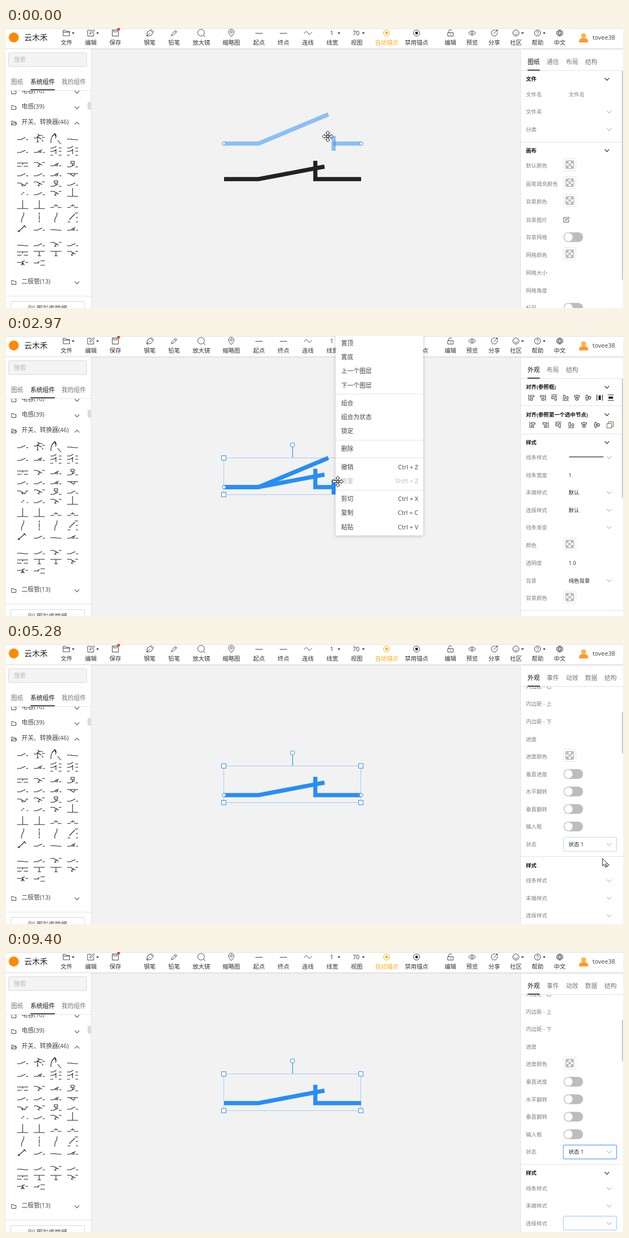
Animation, 1112 px wide and 504 px high, one loop 9.48 s. Source, as an HTML page:

```html
<!DOCTYPE html>
<html lang="zh-CN">
<head>
<meta charset="utf-8">
<title>组合为状态</title>
<style>
html, body { margin: 0; width: 100%; height: 100%; overflow: hidden; background: #f2f2f2; }
svg { display: block; width: 1112px; height: 504px; }
text { font-family: "Open Sans", "Noto Sans CJK SC", "Noto Sans CJK JP", "Noto Sans CJK", sans-serif; white-space: pre; }
.brand { font-size: 14px; fill: #222; }
.bar { font-size: 10.5px; fill: #333; text-anchor: middle; }
.gold { fill: #faad14; }
.side { font-size: 11px; fill: #444; }
.dim { fill: #777; }
.pale { fill: #bbb; }
.on { fill: #111; font-weight: 500; }
.lab { font-size: 9.6px; fill: #808080; }
.val { font-size: 9.6px; fill: #222; }
.head { font-size: 9.6px; fill: #111; font-weight: 600; }
.end { text-anchor: end; }
.pen { fill: none; stroke-width: 7.5; }
.ctl { fill: #fff; stroke: #278df8; stroke-width: 1; }
.cur { fill: #fff; stroke: #222; stroke-width: 1; stroke-linejoin: round; }
</style>
</head>
<body>
<svg id="stage" viewBox="0 0 1112 504"></svg>
<script>
const LOOP = 9480, BLUE = '#278df8', LIGHT = 'rgba(39,141,248,.5)', BLACK = '#222';
const lift = { brand: 5.2, bar: 3.9, side: 4.1, lab: 3.6, val: 3.6, head: 3.6 };

const text = (x, y, s, cls) =>
  `<text x="${x}" y="${y + lift[cls.split(' ')[0]]}" class="${cls}">${s}</text>`;
const path = (d, color = '#444', w = 1, fill = 'none') =>
  `<path d="${d}" fill="${fill}" stroke="${color}" stroke-width="${w}"/>`;
const rect = (x, y, w, h, fill, more = '') =>
  `<rect x="${x}" y="${y}" width="${w}" height="${h}" fill="${fill}" ${more}/>`;
const dot = (x, y, r, more = '') => `<circle cx="${x}" cy="${y}" r="${r}" ${more}/>`;
const at = (x, y, s, more = '') => `<g transform="translate(${x} ${y}) ${more}">${s}</g>`;
const group = (id, s, more = '') => `<g id="${id}" ${more}>${s}</g>`;
const chev = (x, y, color = '#bbb', dir = 1) =>
  path(`M${x - 4} ${y - 2.2 * dir}l4 ${4.4 * dir} 4 ${-4.4 * dir}`, color, 1.1);
const rule = (y, x = 927, w = 185) => rect(x, y, w, 1, '#e3e3e3');

// ---- header ----
const ring = 'M-5.5 0a5.5 5.5 0 1 0 11 0a5.5 5.5 0 1 0-11 0';
const icons = {
  folder: 'M-6 5V-5h4l1.5 2H5.5V5zM-6-1.5H5.5',
  edit: 'M1-5H-6V5.5H5V-.5M-2 1.5l.5-2.5L5-6l1.8 1.8L.5 1z',
  save: 'M-5.5-5.5H4l1.5 1.5V5.5h-11zM-3-5.5v3.5H3v-3.5',
  nib: 'M-5.5 5.5l1.5-7.5 5-3 4.5 4.5-3 5zM-5.5 5.5L0 0M1-5l1.5-1.5L7-2 5.5-.5',
  pencil: 'M-5 5l1-3.5L2.5-5 5-2.5-1.5 4zM1-3.5L3.5-1',
  lens: 'M-6.5-.5a6 6 0 1 0 12 0a6 6 0 1 0-12 0M3.8 3.8L7 7',
  pin: 'M0 6.5Q-5 1-5-2a5 4.8 0 0 1 10 0Q5 1 0 6.5M-2-2a2 2 0 1 0 4 0a2 2 0 1 0-4 0',
  line: 'M-6.5 .5h13',
  wave: 'M-6.5 1.5C-4-4-1.5-3 0 0S4 4 6.5-1.5',
  ring,
  lock: 'M-5 5.5V-.5H5v6zM-3-.5v-3a2.5 2.5 0 0 1 5 0M0 1.5v2',
  eye: 'M-6.5 0Q0-8 6.5 0Q0 8-6.5 0M-2 0a2 2 0 1 0 4 0a2 2 0 1 0-4 0',
  share: 'M1-5.5A5.5 5.5 0 1 0 5.5-1M-1 1.5L5-5M2-5.5h3.5v3.5',
  smile: ring + 'M-3 1q3 4 6 0M-2-2v1M2-2v1',
  help: ring + 'M-1.8-1.3c0-2.5 3.6-2.5 3.6 0C1.8 0 0 0 0 1.6M0 2.6v1',
  globe: ring + 'M0-5.5q-5 5.5 0 11q5-5.5 0-11M-5-2H5M-5 2H5'
};
const tools = [
  [109, '文件', 'folder', 1], [153, '编辑', 'edit', 1], [197, '保存', 'save'], [259, '钢笔', 'nib'],
  [303, '铅笔', 'pencil'], [352, '放大镜', 'lens'], [406, '缩略图', 'pin'], [456, '起点', 'line'],
  [500, '终点', 'line'], [544, '连线', 'wave'], [588, '线宽', '1', 1], [632, '视图', '70', 1],
  [686, '自动锚点', 'ring'], [740, '禁用锚点', 'ring'], [801, '编辑', 'lock'], [840, '预览', 'eye'],
  [880, '分享', 'share'], [919, '社区', 'smile', 1], [958, '帮助', 'help', 1], [998, '中文', 'globe']
];

function header() {
  let s = rect(0, 36, 1112, 3, '#e4e4e4') + rect(0, 0, 1112, 36.5, '#fff') + rect(0, 0, 1112, 1, '#ddd');
  s += dot(14, 17, 9, 'fill="#ff8a00"') + text(33, 17, '云木禾', 'brand');
  for (const [x, name, icon, caret] of tools) {
    const gold = name === '自动锚点';
    s += text(x, 26.5, name, gold ? 'bar gold' : 'bar');
    s += icons[icon] ? at(x, 9, path(icons[icon], gold ? '#faad14' : '#444')) : text(x - 1, 9, icon, 'bar');
    if (icon === 'ring') s += dot(x, 9, 2.5, `fill="${gold ? '#faad14' : '#222'}"`);
    if (caret) s += path(`M${x + 9.5} 8h5l-2.5 3z`, 'none', 0, '#333');
  }
  s += dot(203, 2, 2.5, 'fill="#ff3b1f"');
  s += dot(1041, 14, 4.5, 'fill="#ffb347"') + path('M1033 26v-4q2-4 8-4t8 4v4z', 'none', 0, '#ff9a2e');
  return s + text(1057, 17, 'tovee38', 'side');
}

// ---- left sidebar ----
const glyphs = {
  a: 'M-10 2h6M-4 2l9-4M6 2h4',
  b: 'M-10 2h6M-4 2l9-5M6 2h4M-1-1l4 1v2h-4',
  f: 'M-10-1h5l5-5 6 1M-3-8l3 3M-3 6V-3l7 4M-5 6h4M5-2h5M5 3l2 2',
  q: 'M-9 8Q-10-3-2-9q4 4 1 9M-6-4l4-5 1 5M3 3l6 7',
  l: 'M-10 1h6l9 1M-6 1h5M5 2h5',
  p: 'M-10-6h5l6-3M5-6h5M-10 0h5l6-3M5 0h5M-10 7h5M5 7h5M0-4v9',
  h: 'M-10-3h20M-10 3h8M2 3h8M0-3v3',
  t: 'M-10-4h6M-4-4l9 5M5-4h5M1-2l-3 5M-3 3h4',
  u: 'M-10 4h6l8-4M5 4h5M-3-6h6v4h-6zM0-2v5',
  v: 'M-10-2H10M-5-2l7 5 3-5',
  w: 'M-10-2h6l8 5 3-5h3M-2 1l3 3',
  s: 'M-3 1h3M7 2h3M0-2l3 1',
  D: 'M0-10V5M-10 5h7M3 5h7M-4 5h8',
  j: 'M-10 3h7M3 3h7M-4 0h8M0-3v3',
  e: 'M2-9v4M-2 4v5M2-5L-2 4',
  i: 'M0-9v4M0-4v8M0 5v4',
  k: 'M-9 8h5M-6 4L4-6M4-8h6M6 0h4M6 8h4',
  g: 'M-9 5l4-3L4-6M2-7l4 4M-8 2l3 3',
  T: 'M-10-4h8M2-4h8M-4-4h8M0-4v8M-3 4h6',
  X: 'M-10 0h6l8-3M5 0h5M0-3v8M-3 5l3-5 3 5',
  m: 'M-10 1h9M2-3h8M2 5h8M-3 1l3-3'
};
const grid = ['afql', 'abpp', 'htbu', 'aabv', 'wtua', 'satD', 'DDjj', 'eiek', 'galb', 'lata', 'hTTt', 'Xm'];
const gridY = [199, 222, 246, 264, 281, 298, 320, 341, 362, 390, 406, 422];

function sidebar() {
  const cat = (y, name, open) =>
    at(14, y + 2, path('M-4 3.5v-7h3l1 1.5h4v5.5z' + (open ? 'M-4 3.5l2-3.5h7l-1 3.5' : '')))
    + text(28, y, name, 'side') + chev(128, y + 2.5, '#555', open ? -1 : 1);
  let list = cat(113, '电容(16)') + cat(141, '电感(39)') + cat(169, '开关、转换器(46)', true) + cat(456, '二极管(13)');
  grid.forEach((row, r) => [...row].forEach((k, c) => {
    list += at(30 + 30 * c, gridY[r], path(glyphs[k], '#222', 1.1));
  }));
  return rect(0, 38, 153, 466, '#fff') + rect(153, 38, 1, 466, '#e3e3e3')
    + rect(4.5, 44.5, 141, 25, '#f4f4f4', 'rx="2" stroke="#d9d9d9"') + text(14, 57, '搜索', 'side pale')
    + text(9, 97, '图纸', 'side dim') + text(44, 97, '系统组件', 'side on') + text(100, 97, '我的组件', 'side dim')
    + rule(112, 0, 153) + rect(44, 110.5, 44, 1.5, '#111')
    + `<g clip-path="url(#listClip)">${list}</g>` + rect(147, 133, 6.5, 14, '#dcdcdc', 'rx="2"')
    + rule(482, 0, 153) + rect(8.5, 492.5, 133, 25, '#fff', 'rx="2" stroke="#d9d9d9"')
    + path('M41 500h4v4h-4zM47 502l2.5-2.5 2.5 2.5-2.5 2.5z', '#666') + text(55, 505, '图形库管理', 'side');
}

// ---- right panels ----
const label = (y, s) => text(937, y, s, 'lab');
const value = (y, s) => text(1014, y, s, 'val');
const title = (y, s) => text(937, y, s, 'head') + chev(1083, y + .5, '#222');
const pick = (y, s, v) => label(y, s) + chev(1087, y + .5) + (v ? value(y, v) : '');
const flip = (y, s) => label(y, s) + rect(1005, y - 8.7, 35, 17.4, '#bdbdbd', 'rx="8.7"') + dot(1013.8, y, 7.4, 'fill="#fff"');
const swatch = (y, s) => {
  let c = '';
  for (let i = 0; i < 9; i += 2) c += rect(-6 + i % 3 * 4, -6 + (i / 3 | 0) * 4, 4, 4, '#b5b5b5');
  return label(y, s) + at(1016, y - 1.5,
    rect(-11, -11, 22, 22, '#fff', 'rx="2" stroke="#e4e4e4"') + c + rect(-7, -7, 14, 14, 'none', 'rx="1" stroke="#999"'));
};
const tabs = names => names.map((s, i) => text(940 + 34.6 * i, 60.5, s, i ? 'side dim' : 'side on')).join('')
  + rule(76) + rect(940, 75, 22, 1.5, '#111');
const thumb = (y, h, id = '') => rect(1110, y, 2, h, '#c9c9c9', id);
const clip = s => `<g clip-path="url(#panelClip)">${s}</g>`;

function sheetPanel() {
  return tabs(['图纸', '通信', '布局', '结构']) + title(91.5, '文件')
    + label(119, '文件名') + text(1014, 119, '文件名', 'lab pale') + pick(150.5, '文件夹') + pick(182, '分类')
    + rule(205) + title(220, '画布') + swatch(247.5, '默认颜色') + swatch(280, '画笔填充颜色') + swatch(312, '背景颜色')
    + label(345, '背景图片') + at(1010, 345, path(icons.edit, '#333'), 'scale(.8)') + flip(376.5, '背景网格')
    + swatch(408, '网格颜色') + label(440, '网格大小') + label(472, '网格角度') + flip(503.5, '标尺') + thumb(77, 376);
}

function nodePanel(id, hasState) {
  const d = hasState ? 0 : -31.5;
  const picks = ['线条样式', '末端样式', '连接样式', '线条渐变'];
  let s = label(76, '内边距 - 右') + label(107.5, '内边距 - 上') + label(139, '内边距 - 下') + label(171, '进度')
    + swatch(202, '进度颜色') + flip(234, '垂直进度') + flip(265.5, '水平翻转') + flip(297, '垂直翻转') + flip(328.5, '输入框');
  if (hasState) {
    s += label(360, '状态') + rect(1004.5, 348, 96, 25, '#fff', 'id="stateBox" rx="2"')
      + `<text id="stateName" x="1014" y="363.6" class="val"></text>` + chev(1087, 360.5)
      + rect(1004.5, 444.5, 96, 25, 'none', 'id="hoverBox" rx="2" stroke="#69b1ff"');
  }
  s += rule(382 + d) + title(398 + d, '样式')
    + picks.map((p, i) => pick(425.5 + d + 31.5 * i, p)).join('')
    + swatch(551.5 + d, '颜色') + swatch(584 + d, '浮动颜色') + swatch(616 + d, '选中颜色')
    + label(649 + d, '线条宽度') + value(649 + d, '13');
  return tabs(['外观', '事件', '动效', '数据', '结构'])
    + clip(group(id + 'Body', s, 'transform="translate(0 -132)"')) + thumb(145, 75, `id="${id}Thumb"`);
}

const sideAlign = 'M-5-5.5v11M-2.5-4h7v3h-7zM-2.5 1.5h4.5v3h-4.5z';
const midAlign = 'M0-5.5v1.5M0-1v2M0 4v1.5M-4.5-4h9v3h-9zM-2.5 1h5v3h-5z';
const aligns = [[sideAlign, ''], [sideAlign, 'scale(-1 1)'], [sideAlign, 'rotate(90)'], [sideAlign, 'rotate(-90)'],
  [midAlign, ''], [midAlign, 'rotate(-90)']];
const spread = 'M-5-5.5v11M5-5.5v11M-1.5-3.5h3v7h-3z';

function multiPanel() {
  let s = '';
  aligns.forEach(([d, turn], i) => {
    s += at(947 + 20.5 * i, 111, path(d, '#333'), turn) + at(949 + 23.2 * i, 160, path(d, '#333'), turn);
  });
  s += at(1070, 111, path(spread, '#222', 1.2, '#222')) + at(1090, 111, path(spread, '#222', 1.2, '#222'), 'rotate(90)')
    + path('M1086 157v-2.5h8.5v8.5h-2.5M1083 157.5h8.5v8h-8.5z', '#6b6440');
  return tabs(['外观', '布局', '结构']) + s + title(91.5, '对齐(参照框)') + rule(125)
    + title(141, '对齐(参照第一个选中节点)') + rule(176) + title(191, '样式')
    + pick(218, '线条样式') + rect(1015, 217, 62, 1.2, '#222') + label(250, '线条宽度') + value(250, '1')
    + pick(281.5, '末端样式', '默认') + pick(313, '连接样式', '默认') + pick(344, '线条渐变')
    + swatch(376, '颜色') + label(408, '透明度') + value(408, '1.0') + pick(440, '背景', '纯色背景')
    + swatch(471.5, '背景颜色') + rule(494) + thumb(77, 215);
}

// ---- canvas ----
const openSwitch = '<path d="M393 208h62L581 155.5"/><path d="M590 208h50"/><path d="M590.5 194.5v26.5"/>';
const closedSwitch = '<path d="M393 272h62L574 249.5M557.5 239v33H640"/>';
const anchors = y => dot(393, y, 3.2, 'class="ctl"') + dot(640, y, 3.2, 'class="ctl"');

function selection() {
  let s = rect(392.5, 219.5, 247, 66, 'none', `stroke="${BLUE}" stroke-opacity=".4"`)
    + path('M516.5 219v-19', BLUE, 1.2) + dot(516.3, 196, 4, 'class="ctl"');
  for (const x of [392.5, 639.5]) for (const y of [219.5, 285.5]) s += rect(x - 4, y - 4, 8, 8, '#fff', 'class="ctl"');
  return s;
}

// ---- context menu ----
const menuRows = [[13, '置顶'], [38, '置底'], [63, '上一个图层'], [89, '下一个图层'], [121, '组合'], [146, '组合为状态'],
  [171, '锁定'], [203, '删除'], [236, '撤销', 'Ctrl + Z'], [261, '恢复', 'Shift + Z'], [293, '剪切', 'Ctrl + X'],
  [318, '复制', 'Ctrl + C'], [344, '粘贴', 'Ctrl + V']];
const disabled = name => name === '恢复';

function menu() {
  let s = rect(594, -10, 158, 369, '#fff', 'rx="2" filter="url(#shadow)"') + rect(594.5, 0, 157, 25, '#f3f3f3', 'id="menuHover"');
  for (const y of [104, 187, 219, 277]) s += rule(y, 594, 158);
  for (const [y, name, key] of menuRows) {
    const off = disabled(name) ? ' pale' : '';
    s += text(604, y, name, 'side' + off) + (key ? text(743, y, key, 'side end' + off) : '');
  }
  return s;
}

const dropdown = rect(1005, 376, 95, 56, '#fff', 'rx="3" filter="url(#shadow)"')
  + rect(1008, 379, 89, 24, '#f3f3f3', 'id="optHover" rx="2"') + value(391, '状态 1') + value(416, '状态 2');

function pointers() {
  let s = '';
  for (let a = 0; a < 360; a += 90) s += `<path d="M0-10L4-6H1.6V-2.5H-1.6V-6H-4Z" transform="rotate(${a})"/>`;
  return group('move', s + '<path d="M-2-2h4v4h-4z"/>')
    + group('arrow', '<path d="M0 0V13.5L3 10.8 5.3 16 7.5 15 5.2 10H9.6Z"/>')
    + group('hand', '<path d="M-1.2 9V1Q0-1 1.2 1V6L6 7.2Q7.5 7.8 7.3 9.5L6.2 16H-.5L-4.6 10.5Q-4.8 8.2-3 8.6Z"/>');
}

document.getElementById('stage').innerHTML = `<defs>
  <clipPath id="listClip"><path d="M0 113h153v369H0z"/></clipPath>
  <clipPath id="panelClip"><path d="M928 77h184v427H928z"/></clipPath>
  <filter id="shadow" x="-20%" y="-20%" width="140%" height="140%">
    <feDropShadow dx="0" dy="1" stdDeviation="3" flood-opacity=".22"/></filter></defs>`
  + rect(0, 0, 1112, 504, '#f2f2f2')
  + group('open', openSwitch, 'class="pen"') + group('closed', closedSwitch, 'class="pen"')
  + group('ghost', openSwitch, 'class="pen" stroke="rgba(39,141,248,.25)"')
  + group('guide', path('M393 221.5h247M393 222v18', BLUE, 1), 'opacity=".5"')
  + group('select', selection()) + group('topEnds', anchors(208)) + group('lowEnds', anchors(272))
  + rect(0, 0, 0, 0, 'rgba(39,141,248,.1)', `id="band" stroke="${BLUE}"`)
  + rect(927, 38, 185, 466, '#fff') + rect(927, 38, 1, 466, '#e3e3e3')
  + group('sheet', sheetPanel()) + group('node', nodePanel('node', false))
  + group('multi', multiPanel()) + group('state', nodePanel('state', true))
  + header() + sidebar() + group('menu', menu()) + group('drop', dropdown)
  + group('pointer', dot(0, 0, 10, 'id="press" fill="#ffee32" fill-opacity=".75" stroke="#d8c800"') + pointers(), 'class="cur"');

// ---- motion ----
const el = {};
document.querySelectorAll('[id]').forEach(n => el[n.id] = n);
const show = (id, on) => { el[id].style.display = on ? '' : 'none'; };
const set = (id, attrs) => { for (const k in attrs) el[id].setAttribute(k, attrs[k]); };
const within = (t, a, b) => t >= a && t < b;
const ramp = (t, a, b) => { const p = Math.min(1, Math.max(0, (t - a) / (b - a))); return p * p * (3 - 2 * p); };

const track = [[0, 580, 195], [70, 580, 195], [110, 572, 193], [280, 572, 193], [850, 575, 255], [1040, 575, 255],
  [1160, 575, 259], [1620, 575, 259], [1800, 690, 333], [2050, 368.5, 184], [2110, 368.5, 184], [2550, 584, 270],
  [2610, 584, 270], [2970, 598, 262], [3280, 598, 262], [4080, 656, 149], [4240, 656, 149], [5170, 1075, 386],
  [5280, 1075, 386], [5620, 1060, 361], [5760, 1060, 361], [6180, 1056, 425], [7110, 1056, 425], [7480, 1055, 361],
  [7620, 1055, 361], [8040, 1055, 393], [8180, 1055, 393], [9050, 1050, 482], [9400, 1048, 512], [LOOP, 1048, 512]];
const presses = [[280, 1620], [1800, 2060], [2560, 2640], [4190, 4300], [5660, 5760], [6250, 6340], [7500, 7600], [8090, 8180]];

function pointerAt(t) {
  const i = Math.max(1, track.findIndex(k => k[0] > t));
  const [t0, x0, y0] = track[i - 1], [t1, x1, y1] = track[i], p = ramp(t, t0, t1);
  return [x0 + (x1 - x0) * p, y0 + (y1 - y0) * p];
}

function draw(t) {
  const [x, y] = pointerAt(t);
  const second = within(t, 6320, 8150), drag = within(t, 280, 1620), banding = within(t, 1800, 2060);

  show('open', t < 4240 || second);
  show('closed', !second);
  set('open', {
    transform: `translate(0 ${t < 1620 ? 0 : 64})`,
    stroke: t < 280 || t >= 3300 ? LIGHT : within(t, 1800, 2070) ? BLACK : BLUE
  });
  set('closed', { stroke: t < 2070 ? BLACK : BLUE });
  show('ghost', drag);
  set('ghost', { transform: `translate(0 ${y - 193.5})` });
  show('guide', within(t, 850, 1620));
  show('select', t >= 2070);
  show('topEnds', t < 280);
  show('lowEnds', within(t, 2550, 6320));
  show('band', banding);
  if (banding) set('band', { x, y, width: Math.max(0, 690 - x), height: Math.max(0, 333 - y) });

  show('sheet', t < 280 || within(t, 1800, 2070));
  show('node', within(t, 280, 1800));
  show('multi', within(t, 2070, 4240));
  show('state', t >= 4240);
  const scroll = t < 6300 ? -100 * (1 - ramp(t, 4800, 5120)) : -.5;
  set('stateBody', { transform: `translate(0 ${scroll})` });
  set('stateThumb', { y: 122 - scroll * .17 });
  el.stateName.textContent = second ? '状态 2' : '状态 1';
  const focus = t >= 5700;
  set('stateBox', { stroke: focus ? '#69b1ff' : t >= 5150 ? '#b5d8f8' : 'none', 'stroke-width': focus ? 1.4 : 1 });
  const hover = within(t, 6500, 7200) || within(t, 8550, 8850) ? 1 : within(t, 8300, 8550) ? 0 : t >= 8850 ? 2 : -1;
  show('hoverBox', hover >= 0);
  set('hoverBox', { y: 413 + 31.5 * hover, 'stroke-opacity': hover === 2 ? .7 : 1 });

  show('menu', within(t, 2610, 4240));
  const row = menuRows.find(r => Math.abs(r[0] - y) < 12.6 && x > 594 && !disabled(r[1]));
  show('menuHover', row);
  if (row) set('menuHover', { y: row[0] - 12.5 });
  const fade = ramp(t, 5700, 5820) - ramp(t, 6320, 6500) + ramp(t, 7560, 7680) - ramp(t, 8150, 8330);
  show('drop', fade > 0);
  set('drop', { opacity: fade });
  set('optHover', { y: y > 403 ? 404 : 379 });

  const kind = t < 1650 || within(t, 2480, 4300) ? 'move' : within(t, 1650, 2480) || within(t, 4300, 5480) ? 'arrow' : 'hand';
  for (const k of ['move', 'arrow', 'hand']) show(k, k === kind);
  show('press', presses.some(([a, b]) => within(t, a, b)));
  set('pointer', { transform: `translate(${x} ${y})` });
}

function tick() {
  draw(performance.now() % LOOP);
  requestAnimationFrame(tick);
}
tick();
</script>
</body>
</html>
```
